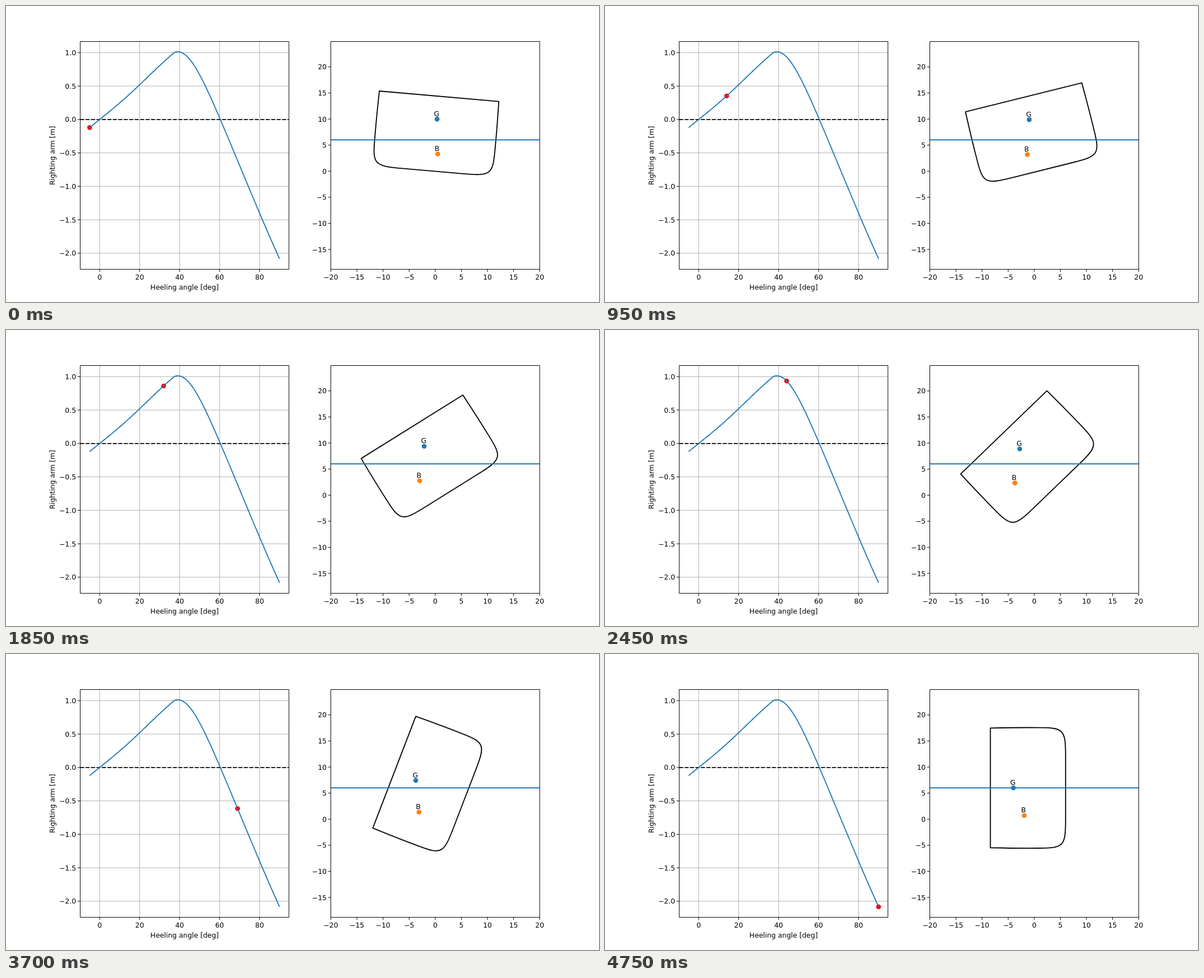
These frames come from a looping animation (1058x529 px, 4800 ms). An HTML page with a canvas:

```html
<!DOCTYPE html>
<html lang="en">
<head>
<meta charset="utf-8">
<title>Righting arm</title>
<style>
html, body { margin: 0; width: 100%; height: 100%; overflow: hidden; background: #fff; }
canvas { display: block; width: 1058px; height: 529px; }
</style>
</head>
<body>
<canvas id="stage" width="1058" height="529"></canvas>
<script>
const ctx = document.getElementById('stage').getContext('2d');
const BLUE = '#1f77b4', ORANGE = '#ff7f0e', GRID = '#b0b0b0', THICK = 1.84;
const STEP = 50, STEPS = 96, START = -5, END = 90;
const WATER = 6, KG = 10;

const TOP = 63.5, BOTTOM = 470.6, UNIT = 9.318;
const left = { x0: 132.4, x1: 504.8, x: a => 167.1 + a * 3.5666, y: v => 202.8 - v * 119.5 };
const right = { x0: 579.5, x1: 952.2, x: v => 765.85 + v * UNIT, y: v => 295.2 - v * UNIT };

// Righting arm against heel in degrees: steady rise, then a rounded peak and fall
function armAt(a) {
  if (a < 37.3) return a * (.0241 + .0028 * Math.sin(a * Math.PI / 66) ** 2);
  const d = a - 39.1;
  return 1.012 - .803 * Math.log(Math.cosh(d / 11)) + .065 * (d / 51) ** 6;
}

// Height of the buoyancy centre relative to the water
const depthAt = rad => -2.7 - 2.88 * Math.sin(.8 * rad) ** 2;

// Hull section around the waterline centre: flat deck, bulging sides, round bilges
const hull = new Path2D();
hull.moveTo(-11.48, 8.4);
hull.quadraticCurveTo(-11.6, 3, -11.56, -1);
hull.bezierCurveTo(-11.56, -5.7, -11.1, -6, -6, -6);
hull.lineTo(6, -6);
hull.bezierCurveTo(11.1, -6, 11.56, -5.7, 11.56, -1);
hull.quadraticCurveTo(11.6, 3, 11.48, 8.4);
hull.closePath();

function line(x0, y0, x1, y1, color, width, dash = []) {
  ctx.strokeStyle = color;
  ctx.lineWidth = width;
  ctx.setLineDash(dash);
  ctx.beginPath();
  ctx.moveTo(x0, y0);
  ctx.lineTo(x1, y1);
  ctx.stroke();
  ctx.setLineDash([]);
}

function dot(x, y, color) {
  ctx.fillStyle = color;
  ctx.beginPath();
  ctx.arc(x, y, 4.3, 0, 2 * Math.PI);
  ctx.fill();
}

function text(str, x, y, align) {
  ctx.fillStyle = '#000';
  ctx.textAlign = align;
  ctx.fillText(str, x, y);
}

function range(from, to, step) {
  const out = [];
  for (let v = from; v <= to; v += step) out.push(v);
  return out;
}

function ticks(ax, xs, ys, digits) {
  const label = (v, d) => v.toFixed(d).replace('-', '\u2212');
  for (const v of xs) {
    const x = ax.x(v);
    line(x, BOTTOM, x, BOTTOM + 4.6, '#000', 1);
    text(label(v, 0), x, 489.2, 'center');
  }
  for (const v of ys) {
    const y = ax.y(v);
    line(ax.x0, y, ax.x0 - 4.6, y, '#000', 1);
    text(label(v, digits), ax.x0 - 7.4, y + 4.6, 'right');
  }
}

function frame(ax) {
  ctx.strokeStyle = '#000';
  ctx.lineWidth = 1;
  ctx.strokeRect(ax.x0, TOP, ax.x1 - ax.x0, BOTTOM - TOP);
}

function drawChart(heel) {
  const xs = range(0, 80, 20), ys = range(-2, 1, .5);
  for (const v of xs) line(left.x(v), TOP, left.x(v), BOTTOM, GRID, 1);
  for (const v of ys) line(left.x0, left.y(v), left.x1, left.y(v), GRID, 1);
  ticks(left, xs, ys, 1);
  line(left.x0, left.y(0), left.x1, left.y(0), '#000', THICK, [6.8, 2.94]);
  dot(left.x(heel), left.y(armAt(heel)), '#f00');

  ctx.strokeStyle = BLUE;
  ctx.lineWidth = THICK;
  ctx.lineJoin = 'round';
  ctx.beginPath();
  for (const a of range(START, END, .5)) ctx.lineTo(left.x(a), left.y(armAt(a)));
  ctx.stroke();
  frame(left);

  text('Heeling angle [deg]', 318.6, 506.6, 'center');
  ctx.save();
  ctx.translate(86.6, 267.3);
  ctx.rotate(-Math.PI / 2);
  text('Righting arm [m]', 0, 0, 'center');
  ctx.restore();
}

function drawHull(rad) {
  ctx.save();
  ctx.translate(right.x(0), right.y(WATER));
  ctx.rotate(-rad);
  ctx.scale(UNIT, -UNIT);
  ctx.strokeStyle = '#000';
  ctx.lineWidth = THICK / UNIT;
  ctx.lineJoin = 'round';
  ctx.stroke(hull);
  ctx.restore();
}

function mark(name, vx, vy, color) {
  const x = right.x(vx), y = right.y(vy);
  dot(x, y, color);
  text(name, x - 5.6, y - 5.3, 'left');
}

function drawSection(heel) {
  const rad = heel * Math.PI / 180, lever = KG - WATER;
  const gx = -lever * Math.sin(rad);
  ticks(right, range(-20, 20, 5), range(-15, 20, 5), 0);
  drawHull(rad);
  line(right.x0, right.y(WATER), right.x1, right.y(WATER), BLUE, THICK);
  mark('G', gx, WATER + lever * Math.cos(rad), BLUE);
  mark('B', gx - armAt(heel), WATER + depthAt(rad), ORANGE);
  frame(right);
}

function render() {
  const heel = START + Math.floor(performance.now() / STEP) % STEPS;
  ctx.fillStyle = '#fff';
  ctx.fillRect(0, 0, 1058, 529);
  ctx.font = '12.35px "DejaVu Sans", sans-serif';
  drawChart(heel);
  drawSection(heel);
  requestAnimationFrame(render);
}
render();
</script>
</body>
</html>
```
